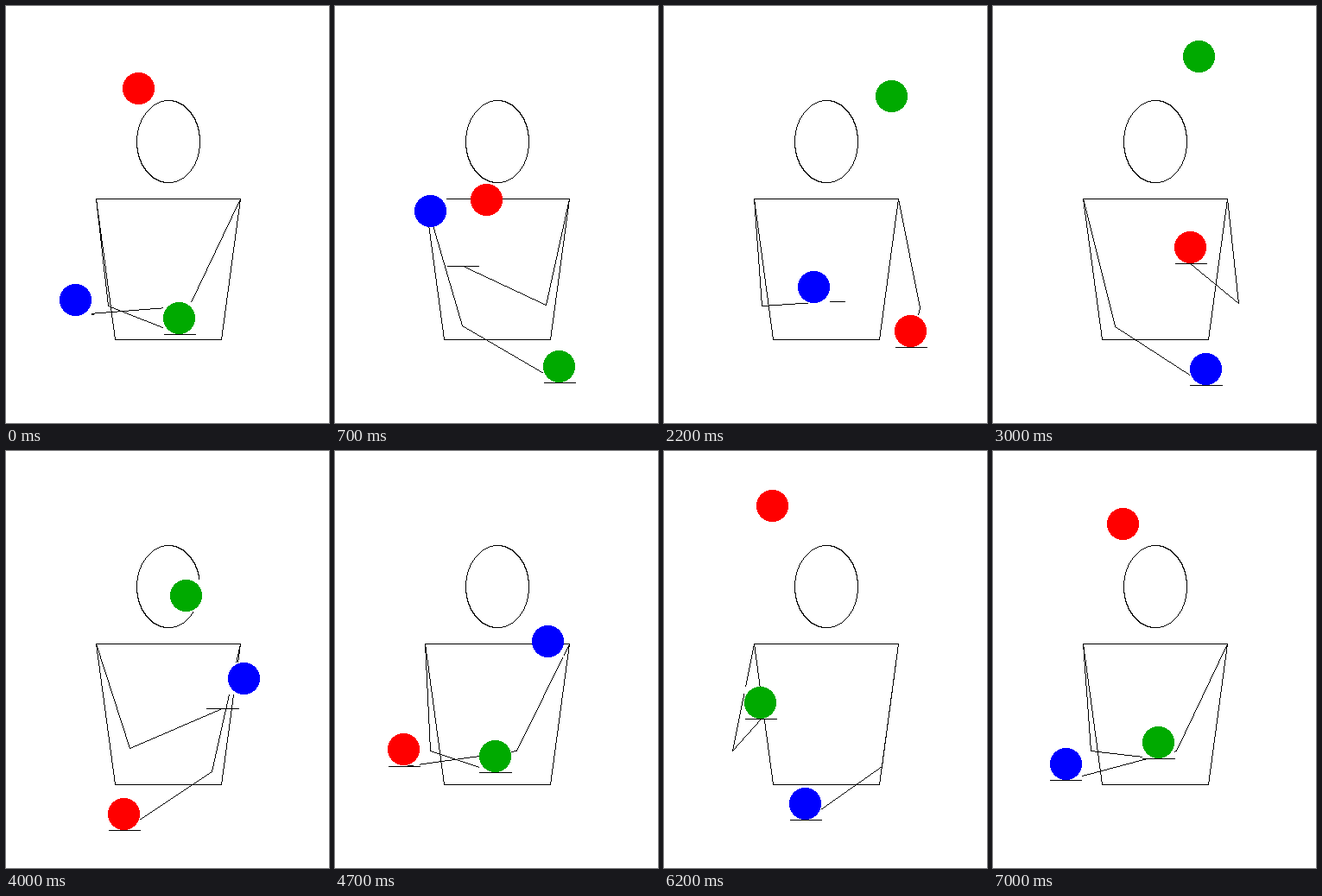
Write an HTML page with a canvas that moves like this. It is 374x483 px and loops after 7.1 s.

```html
<!DOCTYPE html>
<html lang="en">
<head>
<meta charset="utf-8">
<title>Juggler</title>
<style>
  html, body { margin: 0; width: 100%; height: 100%; overflow: hidden; background: #fff; }
  canvas { display: block; }
</style>
</head>
<body>
<canvas id="stage" width="374" height="483"></canvas>
<script>
const ctx = document.getElementById('stage').getContext('2d');

const STEP_MS = 100, STEPS = 71, BEATS = 6;
const CM = 3.63;                 // pixels per centimetre
const MID = 188, BASE = 368.5;   // body axis, height of throws and catches
const SIZE = 37;
const SWING = 290.4;             // hand arc, pixels per beat squared
const GRAVITY = 130.2;           // ball arc, pixels per beat squared

// Right hand's distance from the body axis on each beat, in centimetres.
const REACH = [-30, 0.28, 30, -2.5, -30, 2.5];

const wrap = beat => ((beat % BEATS) + BEATS) % BEATS;
const mix = (a, b, k) => a + (b - a) * k;

function rightHand(beat) {
  const b = wrap(beat), i = Math.floor(b), k = b - i;
  const arc = SWING * k * (1 - k);
  return {
    x: MID + CM * mix(REACH[i], REACH[(i + 1) % BEATS], k),
    y: BASE + (i % 2 ? arc : -arc)
  };
}

// The left hand mirrors the right one half a cycle later.
function leftHand(beat) {
  const p = rightHand(beat - BEATS / 2);
  return { x: 2 * MID - p.x, y: p.y };
}

// Each phase: start beat, length, throwing hand, catching hand (equal to null when held).
const balls = [
  { color: '#f00', phases: [[1, 3, rightHand, null], [4, 3, rightHand, rightHand]] },
  { color: '#0a0', phases: [[4, 3, leftHand, null], [1, 3, leftHand, leftHand]] },
  { color: '#00f', phases: [[0, 2, rightHand, leftHand], [2, 1, leftHand, null],
                            [3, 2, leftHand, rightHand], [5, 1, rightHand, null]] }
];

function ballPosition(ball, beat) {
  const [start, length, from, to] = ball.phases.find(p => wrap(beat - p[0]) < p[1]);
  if (!to) return from(beat);
  const u = wrap(beat - start);
  return {
    x: mix(from(start).x, to(start + length).x, u / length),
    y: BASE + 0.4 - GRAVITY * u * (length - u)
  };
}

const dot = (x, y) => ctx.fillRect(x, y, 1, 1);

// Hard-edged one pixel line.
function line(x0, y0, x1, y1) {
  const n = Math.max(Math.abs(x1 - x0), Math.abs(y1 - y0), 1);
  for (let i = 0; i <= n; i++) {
    dot(Math.round(mix(x0, x1, i / n)), Math.round(mix(y0, y1, i / n)));
  }
}

function oval(cx, cy, rx, ry) {
  for (let y = Math.ceil(cy - ry); y <= cy + ry; y++) {
    const w = rx * Math.sqrt(1 - ((y - cy) / ry) ** 2);
    dot(Math.floor(cx - w), y);
    dot(Math.floor(cx + w), y);
  }
  for (let x = Math.ceil(cx - rx); x <= cx + rx; x++) {
    const h = ry * Math.sqrt(1 - ((x - cx) / rx) ** 2);
    dot(x, Math.floor(cy - h));
    dot(x, Math.floor(cy + h));
  }
}

function body() {
  oval(MID, 157, 36.5, 47.5);
  line(104, 223, 271, 223);
  line(271, 223, 249, 386);
  line(249, 386, 126, 386);
  line(126, 386, 104, 223);
}

// The elbow rests until the hand leaves its slack zone, then follows at half rate.
function bend(rest, hand) {
  const slack = 12 * CM, d = hand - rest;
  return rest + Math.sign(d) * Math.max(0, Math.abs(d) - slack) / 2;
}

function arm(side, hand) {
  const shoulder = side < 0 ? 104 : 271;
  const ex = Math.floor(bend(MID + side * 30 * CM, hand.x));
  const ey = Math.round(bend(BASE - 6 * CM, hand.y));
  const hx = Math.floor(hand.x), hy = Math.round(hand.y);
  line(shoulder, 223, ex, ey);
  line(ex, ey, hx, hy);
  line(Math.round(hand.x - 18.4), hy, Math.round(hand.x + 17.9), hy);
}

function drawBall(color, p) {
  const left = Math.round(p.x - 18.7), top = Math.round(p.y) - SIZE;
  ctx.fillStyle = '#fff';
  ctx.fillRect(left, top, SIZE, SIZE);
  ctx.fillStyle = color;
  for (let i = -18; i <= 18; i++) {
    const w = Math.floor(Math.sqrt(18.5 ** 2 - i * i));
    ctx.fillRect(left + 18 - w, top + 18 + i, 2 * w + 1, 1);
  }
}

function draw() {
  const step = Math.floor(performance.now() / STEP_MS) % STEPS;
  const beat = (step + 0.48) * BEATS / STEPS;
  ctx.fillStyle = '#fff';
  ctx.fillRect(0, 0, 374, 483);
  ctx.fillStyle = '#000';
  body();
  arm(-1, leftHand(beat));
  arm(1, rightHand(beat));
  for (const ball of balls) drawBall(ball.color, ballPosition(ball, beat));
  requestAnimationFrame(draw);
}
draw();
</script>
</body>
</html>
```
